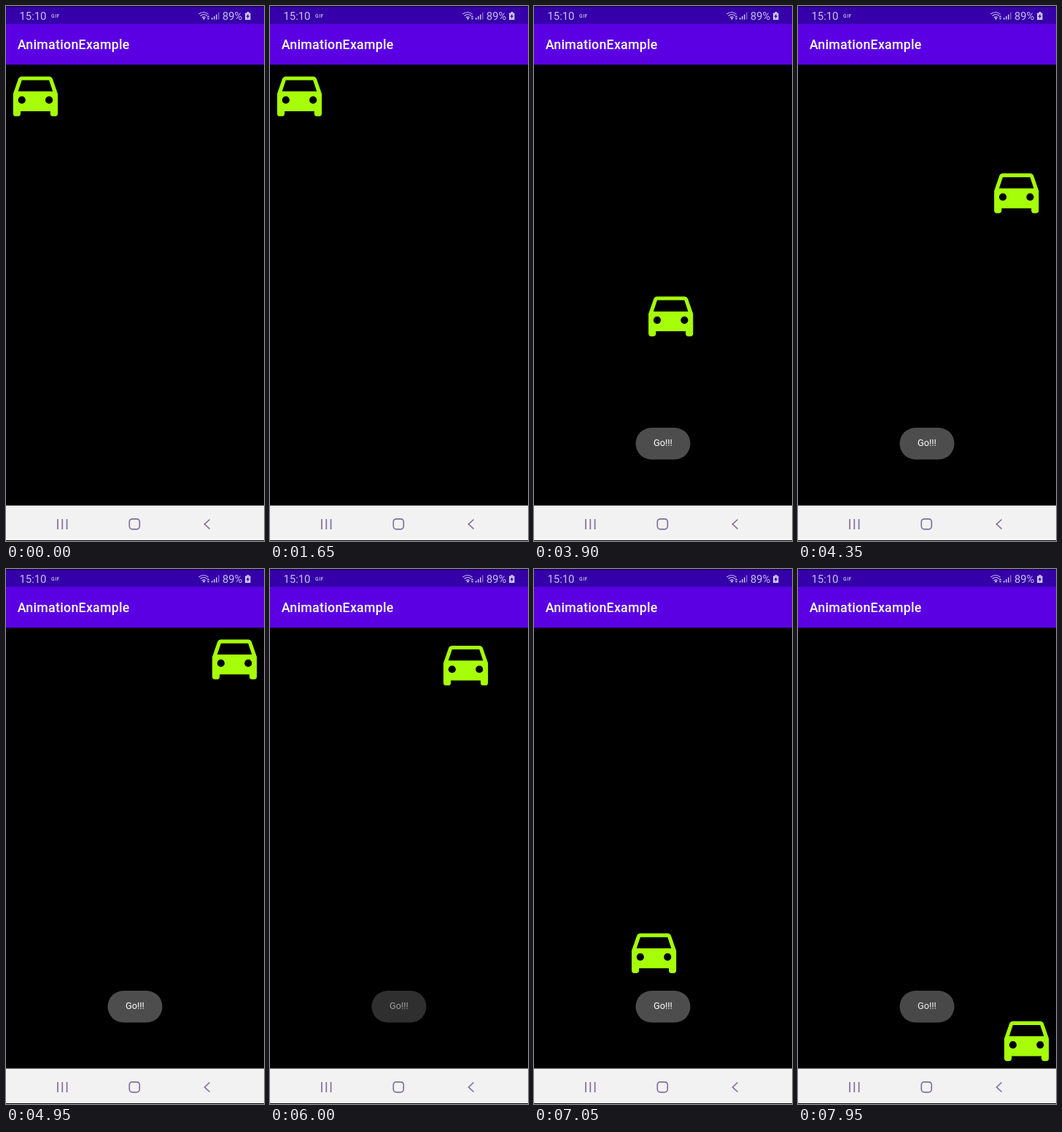
An HTML page for the animation above (8 s loop, 354 px wide and 732 px high).

```html
<!DOCTYPE html>
<html lang="en">
<head>
<meta charset="utf-8">
<title>AnimationExample</title>
<style>
  html, body { margin: 0; width: 100%; height: 100%; overflow: hidden; background: #000; }
  svg { display: block; width: 100%; height: 100%; font-family: Roboto, sans-serif; }
  .status { fill: #cbc0ec; }
  .line { fill: none; stroke: #cbc0ec; stroke-width: 1.2; }
  .nav { fill: none; stroke: #80709c; stroke-width: 1.7; }
</style>
</head>
<body>
<svg viewBox="0 0 354 732">
  <rect width="354" height="732"/>
  <rect y="1" width="354" height="24" fill="#3500a9"/>
  <rect width="354" height="1.5" fill="#1c0058"/>
  <rect y="24.5" width="354" height="55.8" fill="#5b00e2"/>

  <g class="status">
    <text x="18.4" y="18.5" font-size="14.9">15:10</text>
    <text x="62" y="16" font-size="6.8" font-weight="500" letter-spacing=".5">GIF</text>
    <text x="297" y="18.5" font-size="14.7">89%</text>
    <path d="M282 16h1.5v2.5H282zM285 14h1.5v4.5H285zM288 11.5h1.5v7H288z"/>
    <path d="M291 8.5h1.5v10H291z" opacity=".5"/>
    <path d="M330.5 8h3v1.5h2V19H328V9.500h2.500z"/>
    <circle cx="271.5" cy="17.3" r="1.3"/>
    <path d="M277.5 13l1.800 2.300h-3.600zM277.500 18.800l1.800-2.300h-3.600z"/>
  </g>
  <path class="line" d="M264.500 11q6.500-5 13 0M266.500 13.500q5-4 9.500 0M268.800 15.800q2.700-2 5 0"/>
  <path d="M332.500 10.500l-3 4.200h2l-.6 3 3.200-4.400h-2.100z" fill="#3500a9"/>

  <text x="15.7" y="59" font-size="17.800" font-weight="500" letter-spacing=".27" fill="#fff">AnimationExample</text>

  <g id="car">
    <path transform="scale(3.4)" fill="#a6ff08" fill-rule="evenodd" d="M18.92 6.01C18.72 5.42 18.16 5 17.5 5h-11c-.66 0-1.21.42-1.42 1.01L3 12v8c0 .55.45 1 1 1h1c.55 0 1-.45 1-1v-1h12v1c0 .55.45 1 1 1h1c.55 0 1-.45 1-1v-8zM5 14.500a1.500 1.500 0 1 0 3 0a1.500 1.500 0 1 0-3 0zM16 14.500a1.500 1.500 0 1 0 3 0a1.500 1.500 0 1 0-3 0zM5 11l1.500-4.500h11L19 11z"/>
  </g>

  <g id="toast" opacity="0">
    <rect x="139.5" y="577" width="75" height="43.5" rx="21.75" fill="#4d4d4d"/>
    <text x="164" y="602" font-size="12.8" fill="#fff">Go!!!</text>
  </g>

  <rect y="683.5" width="354" height="47.5" fill="#f2f2f2"/>
  <path class="nav" d="M71 702v14M77.300 702v14M83.600 702v14"/>
  <rect class="nav" x="169.300" y="701.800" width="14" height="14" rx="4"/>
  <path class="nav" d="M279.500 702.500l-7 6.500 7 6.500"/>
</svg>
<script>
  const LOOP = 8000, STEP = 150, LEFT = -0.4, TOP = 79.4;
  const car = document.getElementById('car');
  const toast = document.getElementById('toast');

  // Two half ellipses: left to right along the top, then down the right side.
  const drives = [
    { start: 2784, duration: 2190, d: 'M0 0A136.6 302 0 0 0 273.2 0' },
    { start: 5630, duration: 2230, d: 'M273.2 0A177 261.2 0 0 0 273.2 522.4' }
  ];
  for (const drive of drives) {
    drive.path = document.createElementNS('http://www.w3.org/2000/svg', 'path');
    drive.path.setAttribute('d', drive.d);
    drive.length = drive.path.getTotalLength();
  }

  const clamp = v => Math.min(1, Math.max(0, v));
  const ease = p => (1 - Math.cos(Math.PI * p)) / 2;
  const toastAlpha = age => clamp((age - 75) / 480) * clamp((2790 - age) / 500);

  function render(time) {
    const t = Math.floor(time / STEP) * STEP;
    const drive = t < drives[1].start ? drives[0] : drives[1];
    const age = t - drive.start;
    const at = drive.path.getPointAtLength(drive.length * ease(clamp(age / drive.duration)));
    car.setAttribute('transform', `translate(${at.x + LEFT} ${at.y + TOP})`);
    toast.setAttribute('opacity', toastAlpha(age));
  }

  const begin = performance.now();
  function tick() {
    render((performance.now() - begin) % LOOP);
    requestAnimationFrame(tick);
  }
  tick();
</script>
</body>
</html>
```
